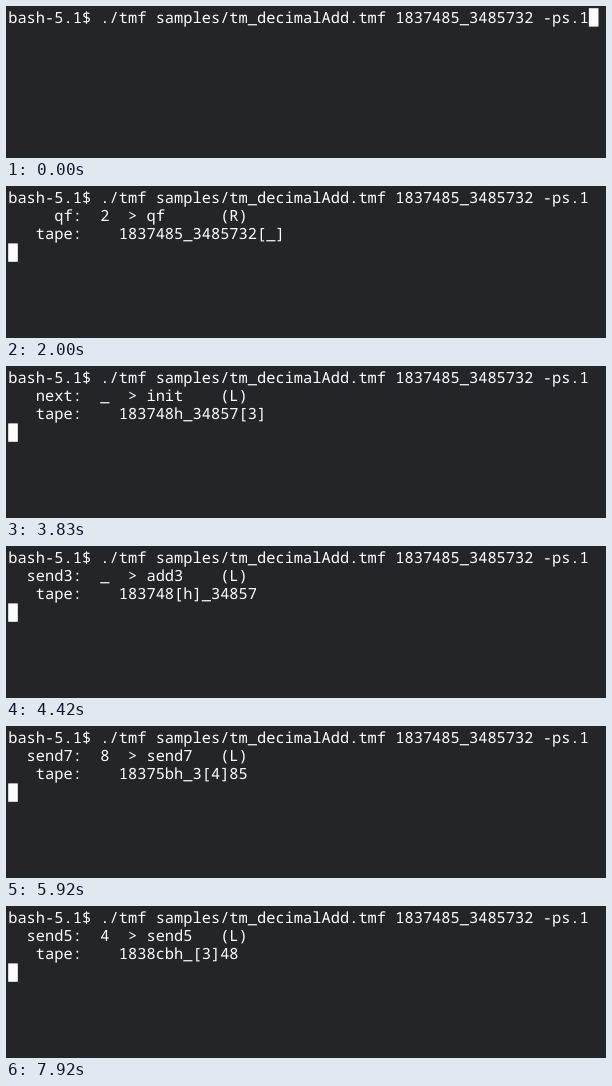
Animation of 600 by 152 pixels, one loop 8 s. Source, as an HTML page:

```html
<!DOCTYPE html>
<html lang="en">
<head>
<meta charset="utf-8">
<title>Turing machine in a terminal</title>
<style>
  html, body { margin: 0; width: 100%; height: 100%; overflow: hidden; background: #242529; }
  svg { display: block; width: 600px; height: 152px; }
  text {
    font: 15.36px "Noto Sans Mono", "DejaVu Sans Mono", monospace;
    fill: #fff;
    white-space: pre;
    text-rendering: geometricPrecision;
  }
  rect { fill: #fff; }
</style>
</head>
<body>
<svg viewBox="0 0 600 152">
  <text></text><text></text><text></text>
  <rect width="9.6" height="18.4"/>
</svg>
<script>
const LOOP = 8000, TICKS_PER_SECOND = 12, FIRST_TICK = 8, LAST_TICK = 95;
const LEFT = 2.2, TOP = 2.2, COL = 9.217, ROW = 18.4, ASCENT = 14.3;
const INPUT = '1837485_3485732';
const COMMAND = `bash-5.1$ ./tmf samples/tm_decimalAdd.tmf ${INPUT} -ps.1`;

// Ticks on which the display stands still, and the one that catches up.
const HOLDS = new Set([13, 17, 26, 31, 39, 45, 55, 57, 61, 63, 73, 77, 79, 87, 93]);
const DOUBLE = 62;

const isDigit = c => c >= '0' && c <= '9';

// Transition rule: [next state, move, symbol to write (optional)]
function rule(state, c) {
  const name = state.replace(/\d$/, ''), n = Number(state.slice(-1));
  switch (name) {
    case 'qi': return [c === '_' ? 'qf' : 'qi', 'R'];
    case 'qf': return c === '_' ? ['init', 'L'] : ['qf', 'R'];
    case 'init': return ['send' + c, 'L', '_'];
    case 'send': return [c === '_' ? 'add' + n : state, 'L'];
    case 'add': {
      if (!isDigit(c)) return [state, 'L'];
      const sum = Number(c) + n, mark = 'abcdefghij'[sum % 10];
      return sum > 9 ? ['carry', 'L', mark] : ['fetch', 'R', mark];
    }
    case 'carry': return ['fetch', 'R', String(Number(c) + 1)];
    case 'fetch': return [c === '_' ? 'sense' : 'fetch', 'R'];
    case 'sense': return ['next', 'R'];
    case 'next': return c === '_' ? ['init', 'L'] : ['next', 'R'];
  }
}

function showTape(tape, head) {
  const before = tape.slice(0, head).join('');
  const after = tape.slice(head + 1).join('').replace(/_+$/, '');
  return `   tape:    ${before}[${tape[head] || '_'}]${after}`;
}

function runMachine(count) {
  const tape = [...INPUT], log = [];
  let state = 'qi', head = 0;
  while (log.length < count) {
    const read = tape[head] || '_';
    const [next, move, write] = rule(state, read);
    tape[head] = write || read;
    head += move === 'R' ? 1 : -1;
    const action = write ? `${write},${move}` : move;
    log.push([
      `${state.padStart(7)}:  ${read}  > ${next.padEnd(8)}(${action})`,
      showTape(tape, head)
    ]);
    state = next;
  }
  return log;
}

const stepAtTick = [];
let step = 0;
for (let tick = 0; tick <= LAST_TICK; tick++) {
  if (tick >= FIRST_TICK && !HOLDS.has(tick)) step += tick === DOUBLE ? 2 : 1;
  stepAtTick.push(step);
}
const log = runMachine(step);

const lines = [...document.querySelectorAll('text')];
const cursor = document.querySelector('rect');
lines.forEach((line, row) => {
  line.setAttribute('x', LEFT);
  line.setAttribute('y', TOP + row * ROW + ASCENT);
});
lines[0].textContent = COMMAND;

function placeCursor(col, row) {
  cursor.setAttribute('x', LEFT + col * COL);
  cursor.setAttribute('y', TOP + row * ROW);
}

let shown = -1;
function draw() {
  const time = performance.now() % LOOP;
  const tick = Math.min(LAST_TICK, Math.floor((time + 4) * TICKS_PER_SECOND / 1000));
  const current = stepAtTick[tick];
  if (current !== shown) {
    shown = current;
    const [status, tape] = current ? log[current - 1] : ['', ''];
    lines[1].textContent = status;
    lines[2].textContent = tape;
    if (current) placeCursor(0, 3);
    else placeCursor(COMMAND.length, 0);
  }
  requestAnimationFrame(draw);
}
draw();
</script>
</body>
</html>
```
